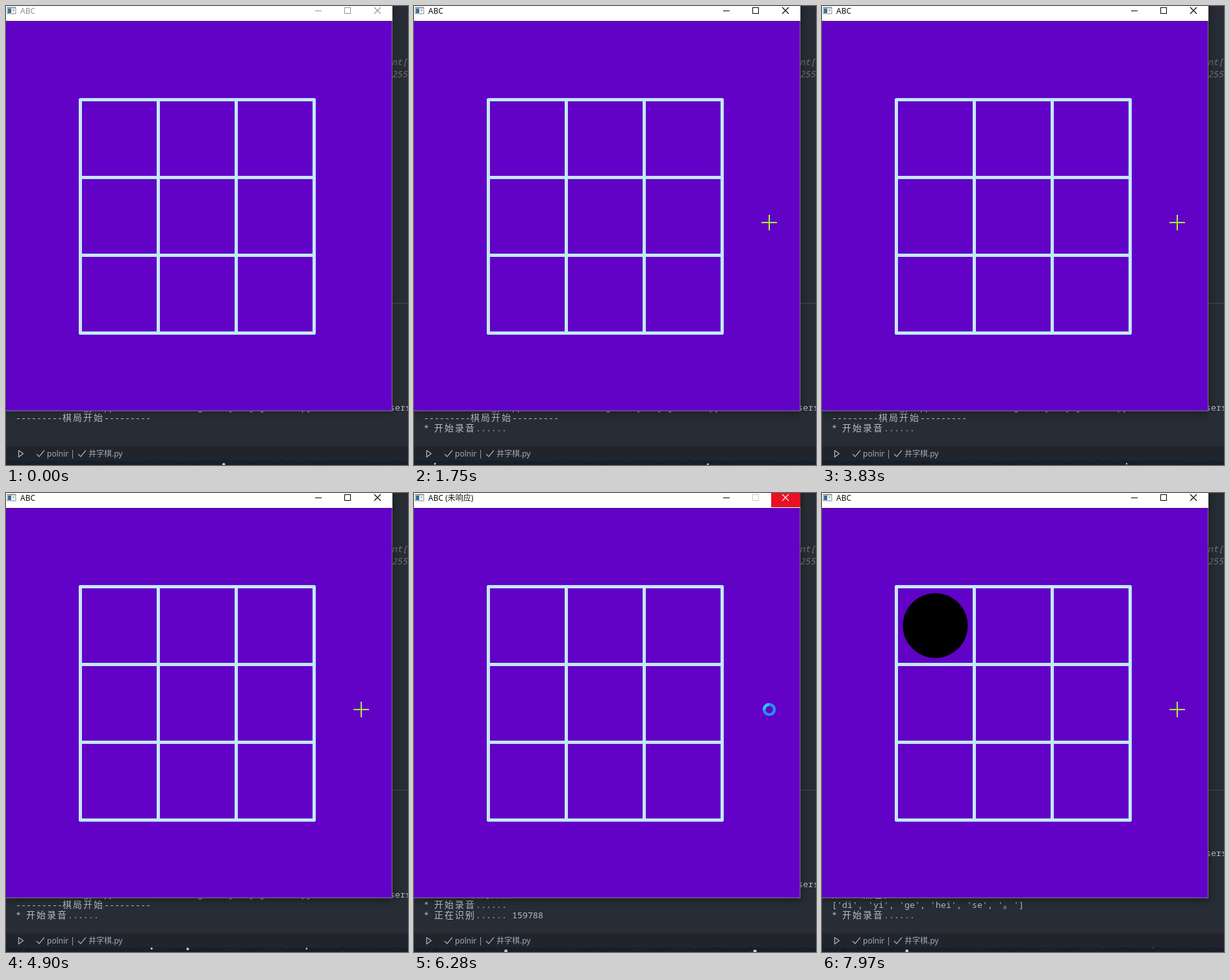
Animation, 619 px wide and 708 px high, one loop 8 s. Source, as an HTML page with a canvas:

```html
<!DOCTYPE html>
<html lang="zh">
<head>
<meta charset="utf-8">
<title>ABC</title>
<style>
  html, body { margin: 0; width: 100%; height: 100%; overflow: hidden; background: #282c34; }
  canvas { display: block; }
</style>
</head>
<body>
<canvas id="stage" width="619" height="708"></canvas>
<script>
const ctx = document.getElementById('stage').getContext('2d');
const LOOP = 8000;
const MONO = '"Noto Sans Mono", "Noto Sans CJK SC", monospace';
const UI = '"Noto Sans", "Noto Sans CJK SC", sans-serif';
const POINTER = { x: 547, y: 334 };

// Moments of the hard changes, in ms
const AT = { enter: 110, arrive: 450, press: 530, release: 790, hang: 5980, resume: 6590, crosshair: 6760 };

const LOG = [
  [0, 'PS D:/demo/angy/apps/local/main/long/daily/toy/just/ru.py --mode ab d:/Users/'],
  [0, '---------棋局开始---------'],
  [560, '* 开始录音......'],
  [5360, '* 正在识别...... 159788'],
  [6590, '第一个黑色。'],
  [6590, "['di', 'yi', 'ge', 'hei', 'se', '。']"],
  [7210, '* 开始录音......']
];

// Rising specks: start ms, x at start, px/s sideways, px/s upwards, radius
const SPECKS = [
  [-140, 334, 9, 7, 2.2],
  [1400, 32, 1, 6, 1.5],
  [1500, 453, -2, 5, 1.5],
  [1900, 243, 1, 7, 2],
  [3150, 473, -5.8, 2.9, 1.3],
  [4020, 222, 2.5, 6, 1.6],
  [4100, 279, 1, 6, 2],
  [6060, 527, -9, 4.8, 2.6],
  [6050, 142, -2, 7, 2.4],
  [7750, 131, -1, 7, 2.4]
];

function rect(x, y, w, h, color) {
  ctx.fillStyle = color;
  ctx.fillRect(x, y, w, h);
}

function line(color, width, ...pts) {
  ctx.strokeStyle = color;
  ctx.lineWidth = width;
  ctx.beginPath();
  pts.forEach(([x, y], i) => i ? ctx.lineTo(x, y) : ctx.moveTo(x, y));
  ctx.stroke();
}

function disc(x, y, r, color) {
  ctx.fillStyle = color;
  ctx.beginPath();
  ctx.arc(x, y, r, 0, Math.PI * 2);
  ctx.fill();
}

function label(str, x, y, font, color) {
  ctx.font = font;
  ctx.fillStyle = color;
  ctx.fillText(str, x, y);
}

// Terminal text sits on 8 px cells, wide glyphs take two
function cells(str, x, y) {
  for (const ch of str) {
    const wide = ch > '\u2fff';
    label(ch, x, y, (wide ? 14 : 13.33) + 'px ' + MONO, '#b6bcc8');
    x += wide ? 16 : 8;
  }
}

function drawEditor(t) {
  rect(0, 0, 619, 708, '#282c34');
  rect(595, 458, 24, 1, '#454a54');
  label('nt[:', 594, 91, 'italic 13.33px ' + MONO, '#747778');
  label('255,', 594, 110, 'italic 13.33px ' + MONO, '#747778');

  const shown = LOG.filter(([at]) => t >= at);
  const rows = Math.max(shown.length, 3);
  shown.forEach(([, str], i) => cells(str, 15, 656 - 16 * (rows - 1 - i)));
}

function check(x) {
  line('#a4aab5', 1.2, [x, 691], [x + 4, 695], [x + 12, 685.5]);
}

function drawStatus() {
  rect(0, 679, 619, 22, '#21252b');
  line('#b4bac5', 1.2, [19.5, 685.5], [26.5, 690.5], [19.5, 695.5], [19.5, 685]);
  check(47);
  label('polnir |', 63, 695, '12px ' + UI, '#a4aab5');
  check(111);
  label('井字棋.py', 127, 695, '12px ' + UI, '#a4aab5');
}

function drawDesktop(t) {
  rect(0, 701, 619, 7, '#16202c');
  let seed = 7;
  const rnd = () => (seed = seed * 16807 % 2147483647) / 2147483647;
  for (let i = 0; i < 260; i++) {
    const x = rnd() * 619, y = 701 + rnd() * 7;
    rect(x, y, 1 + rnd() * 3, 1, rnd() < 0.5 ? '#1c2a39' : '#111a25');
  }
  ctx.save();
  ctx.beginPath();
  ctx.rect(0, 701, 619, 7);
  ctx.clip();
  for (const [at, x, vx, vy, r] of SPECKS) {
    const s = (t - at) / 1000;
    if (s > 0) disc(x + vx * s, 708 - vy * s, r, '#c3ccd3');
  }
  ctx.restore();
}

function drawTitleBar(active, hung) {
  rect(0, 0, 595, 23, '#ffffff');
  rect(1.5, 1.5, 14, 11, '#8a9096');
  rect(2.5, 3.5, 12, 8, '#f2f5f7');
  rect(3, 4, 5, 7, '#35709b');
  rect(10, 5, 3, 3, '#b8c4cd');

  const ink = active ? '#000000' : '#8e959c';
  label(hung ? 'ABC (未响应)' : 'ABC', 22, 12, '12px ' + UI, active ? '#101010' : '#8792a0');
  rect(476, 7, 10, 1, ink);
  ctx.strokeStyle = hung ? '#cccccc' : ink;
  ctx.lineWidth = 1;
  ctx.strokeRect(521.5, 2.5, 9, 9);
  if (hung) rect(550, 0, 45, 22, '#e81123');
  const cross = hung ? '#ffffff' : ink;
  line(cross, 1.1, [567, 2], [577, 12]);
  line(cross, 1.1, [577, 2], [567, 12]);
}

function drawWindow(t) {
  const active = t >= AT.press;
  const hung = t >= AT.hang && t < AT.resume;

  ctx.save();
  ctx.shadowColor = active ? 'rgba(0,0,0,.4)' : 'rgba(0,0,0,.25)';
  ctx.shadowBlur = 14;
  ctx.shadowOffsetY = 2;
  rect(0, -20, 595, 645, '#77767f');
  ctx.restore();

  drawTitleBar(active, hung);
  rect(0, 23, 594, 1, '#4c1296');
  rect(0, 24, 594, 600, '#6202c6');

  ctx.lineJoin = 'round';
  ctx.strokeStyle = '#c2e9fa';
  ctx.lineWidth = 5;
  ctx.strokeRect(114.5, 144.5, 360, 360);
  for (const d of [120, 240]) {
    line('#c2e9fa', 5, [114.5 + d, 144.5], [114.5 + d, 504.5]);
    line('#c2e9fa', 5, [114.5, 144.5 + d], [474.5, 144.5 + d]);
  }
  ctx.lineJoin = 'miter';
  if (t >= AT.resume) disc(174.5, 204.5, 50, '#000000');
}

function drawSpinner(t, x, y) {
  ctx.lineWidth = 4.4;
  const arc = (from, to, color) => {
    ctx.strokeStyle = color;
    ctx.beginPath();
    ctx.arc(x, y, 7.9, from, to);
    ctx.stroke();
  };
  arc(0, Math.PI * 2, '#2492ea');
  const turn = Math.PI * 1.25 + (t - 6280) / 1000 * Math.PI * 2;
  arc(turn - 0.8, turn + 0.8, '#2fc6f6');
}

function drawPointer(t) {
  if (t < AT.enter) return;
  const k = Math.min(1, (t - AT.enter) / (AT.arrive - AT.enter));
  const left = (1 - k) ** 2;
  const x = Math.round(POINTER.x + 68 * left);
  const y = Math.round(POINTER.y + 20 * left);

  if (t >= AT.hang && t < AT.crosshair) return drawSpinner(t, x, y);
  if (x > 595) {
    rect(x, y - 8, 1, 16, '#d5d8de');
    rect(x - 2, y - 9, 5, 1, '#d5d8de');
    rect(x - 2, y + 8, 5, 1, '#d5d8de');
    return;
  }
  const pressed = t >= AT.press && t < AT.release;
  if (pressed) disc(x, y, 12.3, '#ab8163');
  const ink = pressed ? '#c9ae35' : '#a6f432';
  rect(x - 12, y - 1, 24, 2, ink);
  rect(x - 1, y - 12, 2, 24, ink);
}

function frame(now) {
  const t = now % LOOP;
  drawEditor(t);
  drawStatus();
  drawDesktop(t);
  drawWindow(t);
  drawPointer(t);
  requestAnimationFrame(frame);
}
requestAnimationFrame(frame);
</script>
</body>
</html>
```
